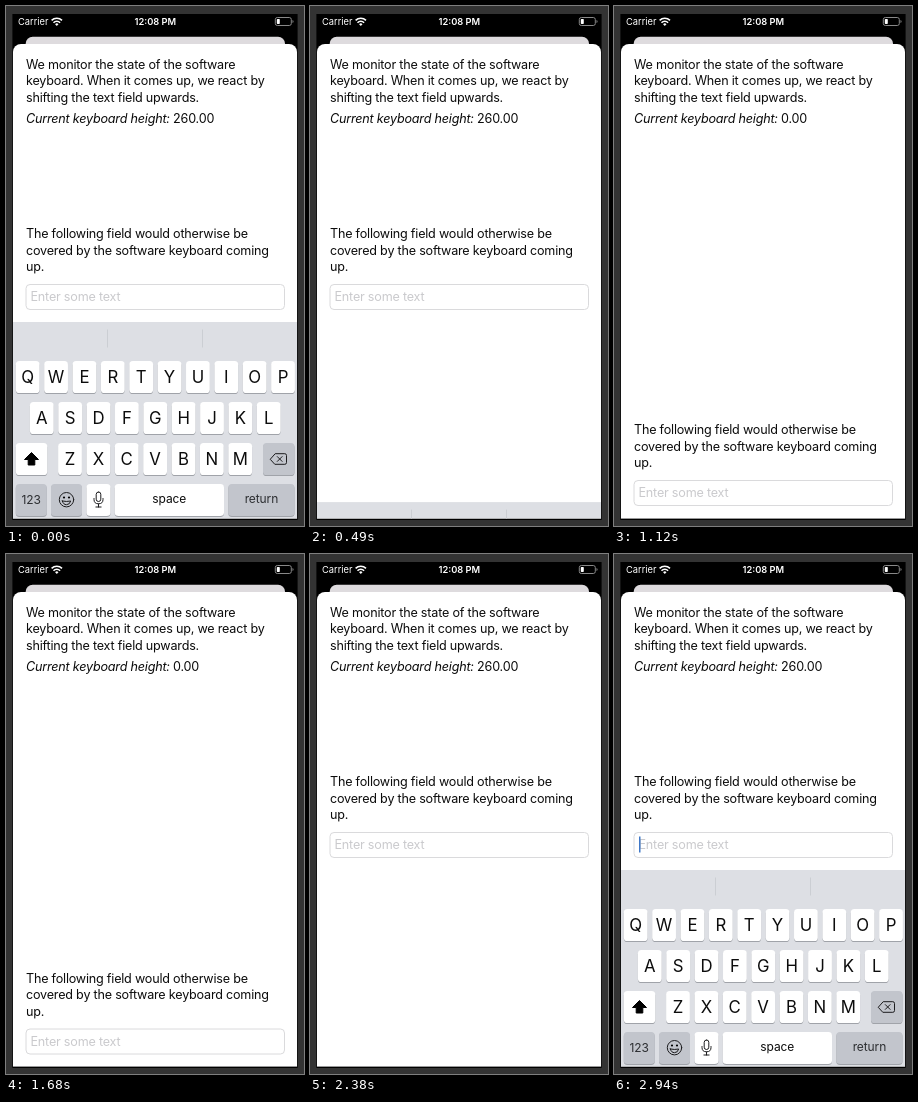
Write an HTML page that moves like this. It is 298 px wide and 520 px high and loops after 3010 ms.

```html
<!DOCTYPE html>
<html lang="en">
<head>
<meta charset="utf-8">
<title>Keyboard avoidance</title>
<style>
  html, body { margin: 0; width: 100%; height: 100%; overflow: hidden; background: #333; }
  svg { display: block; width: 298px; height: 520px; }
  text { font: 12.6px Inter, "Liberation Sans", sans-serif; fill: #0c0c0c; }
  .body text { letter-spacing: -.21px; }
  .body .hint { fill: #cacacd; }
  .status text { font-size: 9.3px; fill: #fff; }
  .status .clock { font-weight: 600; }
  .keys text { text-anchor: middle; }
  .keys .letter { font-size: 16.8px; }
  .keys .label { font-size: 12px; letter-spacing: -.1px; }
  .keys .dim { fill: #2c2e31; }
  .line { fill: none; stroke: #1c1c1e; stroke-linecap: round; stroke-linejoin: round; }
</style>
</head>
<body>
<svg viewBox="0 0 298 520">
  <defs><clipPath id="screen"><rect x="7" y="8" width="284" height="504.6"/></clipPath></defs>
  <rect width="298" height="520" fill="#333"/>
  <rect x="6.4" y="8" width="285.2" height="506" fill="#000"/>
  <g clip-path="url(#screen)">
    <rect x="19.7" y="30.7" width="259.3" height="30" rx="7" fill="#dedbde"/>
    <rect x="7" y="38" width="284" height="500" rx="8" fill="#fff"/>
    <g class="status">
      <text x="12" y="19">Carrier</text>
      <text class="clock" x="149.3" y="19.2" text-anchor="middle">12:08 PM</text>
      <g fill="none" stroke="#fff" stroke-width="1.6">
        <path d="M45.6 14.4a7.4 7.4 0 0 1 10.4 0M47.5 16.7a4.6 4.6 0 0 1 6.6 0"/>
        <path d="M50.8 20l-1.7-1.8a2.4 2.4 0 0 1 3.4 0z" fill="#fff" stroke="none"/>
      </g>
      <rect x="269.3" y="11.5" width="16" height="8" rx="2" fill="none" stroke="#888"/>
      <rect x="270.8" y="13" width="3" height="5" rx=".7" fill="#fff"/>
      <path d="M286.5 14v3q1-.3 1-1.5t-1-1.5" fill="#888"/>
    </g>
    <g class="body">
      <text x="20" y="62.5">We monitor the state of the software</text>
      <text x="20" y="79">keyboard. When it comes up, we react by</text>
      <text x="20" y="95.5">shifting the text field upwards.</text>
      <text x="20" y="117.3"><tspan font-style="italic">Current keyboard height:</tspan> <tspan id="height"></tspan></text>
      <g id="form">
        <text x="20" y="232">The following field would otherwise be</text>
        <text x="20" y="248.5">covered by the software keyboard coming</text>
        <text x="20" y="265">up.</text>
        <rect x="20" y="278.5" width="258.5" height="25" rx="4" fill="#fff" stroke="#dadadc"/>
        <text class="hint" x="24.5" y="295">Enter some text</text>
        <rect id="caret" x="25" y="282.5" width="1.5" height="16" fill="#3f78c8"/>
      </g>
    </g>
    <g id="keyboard" class="keys"></g>
  </g>
</svg>
<script>
const $ = id => document.getElementById(id);
const LOOP = 3010, STEP = 70, TRAVEL = 196.5;

const key = (x, y, w, fill = '#fff') =>
  `<rect x="${x}" y="${y + 1}" width="${w}" height="32" rx="3.6" fill="#a0a3a9"/>
   <rect x="${x}" y="${y}" width="${w}" height="32" rx="3.6" fill="${fill}"/>`;
const label = (x, y, text, type) => `<text class="${type}" x="${x}" y="${y}">${text}</text>`;

function buildKeyboard() {
  const gray = '#c2c5cc', pitch = 28.37;
  let svg = `<rect x="7" y="316" width="284" height="200" fill="#dddfe4"/>
    <path d="M101.5 323.5v18M196.5 323.5v18" stroke="#cbced3"/>`;
  const rows = [['QWERTYUIOP', 21.7, 355], ['ASDFGHJKL', 35.8, 396], ['ZXCVBNM', 64, 437]];
  for (const [letters, start, y] of rows) {
    [...letters].forEach((letter, i) => {
      const x = start + i * pitch;
      svg += key(x - 11.9, y, 23.8) + label(x, y + 22.2, letter, 'letter');
    });
  }
  svg += key(9.8, 437, 31.5) + key(257, 437, 31.5, gray);
  svg += key(9.8, 478, 31, gray) + label(25.2, 498, '123', 'label dim');
  svg += key(45, 478, 31, gray) + key(80.5, 478, 24);
  svg += key(108.7, 478, 109.3) + label(163.3, 497.3, 'space', 'label');
  svg += key(222.3, 478, 66.2, gray) + label(255.4, 497.3, 'return', 'label dim');
  // Shift, delete, smiley and microphone
  return svg + `
    <path d="M25.5 446.5l7 7h-3.7v5.5h-6.6v-5.5h-3.7z" stroke="#000" stroke-linejoin="round"/>
    <path class="line" d="M264.5 453l4.7-5.3h9.6q1.7 0 1.7 1.7v7.2q0 1.7-1.7 1.7h-9.6zM271.3 450.6l4.8 4.8m0-4.8l-4.8 4.8"/>
    <circle class="line" cx="60.5" cy="493.7" r="7.2"/>
    <circle cx="58" cy="491.5" r="1.1"/><circle cx="63" cy="491.5" r="1.1"/>
    <path class="line" d="M56.3 495q4.2 1 8.4 0-1 3.7-4.2 3.7t-4.2-3.7z"/>
    <rect class="line" x="90.2" y="486" width="4.6" height="9.5" rx="2.3"/>
    <path class="line" d="M88 492.5v1q0 4.3 4.5 4.3t4.5-4.3v-1M92.5 498v3m-2.6 0h5.2"/>`;
}

const progress = (t, start, end) => Math.min(1, Math.max(0, (t - start) / (end - start)));
const smooth = p => p * p * (3 - 2 * p);
const move = (id, y) => $(id).setAttribute('transform', `translate(0 ${y.toFixed(2)})`);

function draw(now) {
  const t = Math.floor((now % LOOP) / STEP) * STEP;
  const hide = smooth(progress(t, 50, 585));
  const show = smooth(progress(t, 2380, 2800)) ** 3.75;
  const lower = smooth(progress(t, 784, 1130));
  const raise = smooth(progress(t, 2040, 2240));
  move('keyboard', TRAVEL * (hide - show));
  move('form', TRAVEL * (lower - raise));
  $('height').textContent = t >= 770 && t < 2100 ? '0.00' : '260.00';
  $('caret').style.display = t >= 2800 ? '' : 'none';
}

function tick(now) {
  draw(now);
  requestAnimationFrame(tick);
}

$('keyboard').innerHTML = buildKeyboard();
draw(0);
requestAnimationFrame(tick);
</script>
</body>
</html>
```
